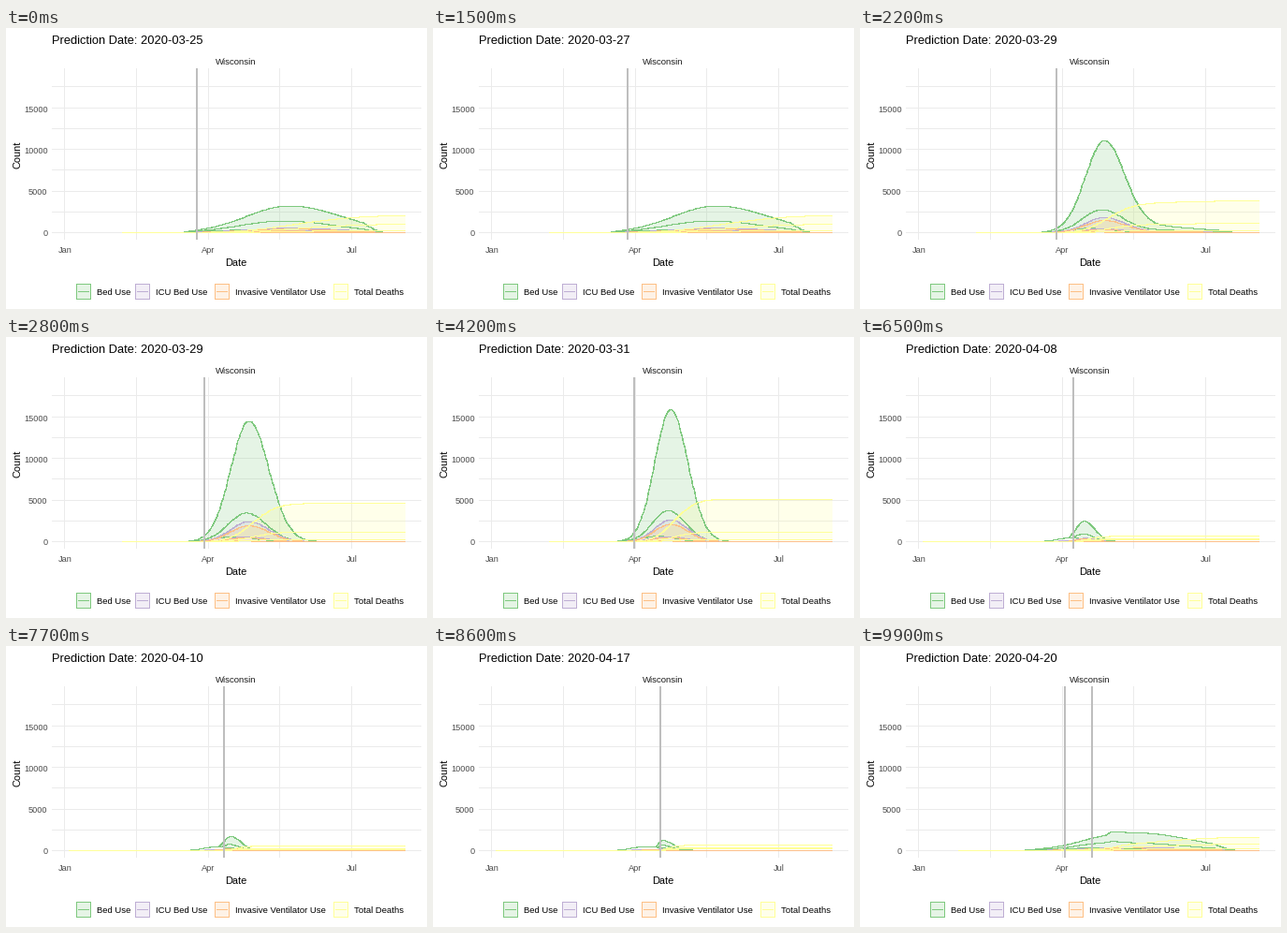
A matplotlib script that plays this animation: 450 by 300 pixels, repeating every 10 s.

```python
import math

import matplotlib.pyplot as plt
import numpy as np
from matplotlib.animation import FuncAnimation
from matplotlib.patches import Polygon, Rectangle

W, H, DPI = 450, 300, 100
PX = 72 / DPI
plt.rcParams["font.family"] = "Liberation Sans"

# plot geometry in pixels
LEFT, RIGHT, TOP, BOTTOM = 49, 444, 43, 226
JAN, DAY_W = 62.5, 1.687
ZERO, UNIT = 218.5, 0.00889
X_END = 426.6

LEGEND = [("Bed Use", "#7fc97f", 75), ("ICU Bed Use", "#beaed4", 138),
          ("Invasive Ventilator Use", "#fdc086", 223), ("Total Deaths", "#ffff99", 350)]
COLORS = [color for _, color, _ in LEGEND]

# release days counted from 1 January
DAYS = [84, 85, 86, 88, 89, 90, 91, 95, 97, 98, 100, 103, 107, 110]
U = np.linspace(0, 1, 214)


def day_x(day):
    return JAN + DAY_W * day


def sigmoid(z):
    return 1 / (1 + np.exp(-np.clip(z, -50, 50)))


def bump(x, peak, left, right):
    return np.exp(-0.5 * ((x - peak) / np.where(x < peak, left, right)) ** 2)


def outlook(day):
    """Peak x, left and right spread, past level, (high, mean, low) of beds and deaths."""
    if day < 88:
        return 303, 46, 56, 0, (3200, 1400, 330), (2050, 1000, 270)
    run = 95 if day == 97 else day  # 7 April repeats the run of 5 April
    early = max(0, 95 - run)
    peak = max(240 + 3 * early, day_x(run) + 2)
    left = 20 * math.exp((88 - run) / 13)
    right = 11 + 1.5 * early
    past = 450 if run > 90 else 0
    high = min(14000 + 1500 * (run - 88), 1150 + 3450 * math.exp((95 - run) / 3.1))
    dead = 0.1 * high ** 1.12 + 40 * max(0, run - 98)
    return (peak, left, right, past,
            (high, 400 + 0.21 * high, 250 + 0.025 * high),
            (dead, min(0.5 * dead, 1150), min(0.3 * dead, 270)))


def build(day):
    """x positions and a (measure, high/mean/low, point) array of counts."""
    peak, left, right, past, beds, deaths = outlook(day)
    first = 124.5 if day < 98 else 67
    x = first + (X_END - first) * U
    limits = sigmoid((x - 192) / 4) * np.clip((404 - x) / 22, 0, 1)
    rise = sigmoid((x - 208) / 5)
    bed, dead = [], []
    for h, total, shift, hold in zip(beds, deaths, (0, 0.15, 0.8), (1, 0.7, 0.3)):
        wave = h * bump(x, peak - shift * left, left, right) * limits
        foot = past * rise * sigmoid((peak + 20 * hold - x) / 6)
        bed.append(np.maximum(wave, foot))
        grown = np.cumsum(bump(x, peak + 4, left, right))
        dead.append(total * grown / grown[-1])
    bed = np.array(bed)
    return x, np.array([bed, 0.165 * bed, 0.132 * bed, dead])


CURVES = [build(day) for day in DAYS]


def label(day):
    month, date = (3, day - 59) if day < 91 else (4, day - 90)
    return f"Prediction Date: 2020-{month:02d}-{date:02d}"


def locate(frame):
    """Current forecast, progress to the next one, forecast named in the title."""
    for i in range(len(DAYS)):
        # a move every 7 frames, the first few slightly ahead of the beat
        beat = 7 * (i + 1)
        start, end = beat - 3 // (i + 1), beat + 2 - (3 >> i)
        if frame < start:
            return i, 0, i
        if frame < end:
            step, steps = frame - start + 1, end - start + 1
            return i, step / steps, i + (step > math.ceil(steps / 2))


fig = plt.figure(figsize=(W / DPI, H / DPI), dpi=DPI, facecolor="white")
ax = fig.add_axes([0, 0, 1, 1])
ax.set_xlim(0, W)
ax.set_ylim(H, 0)
ax.axis("off")


def stroke(xs, ys, color, width=0.3, z=3):
    """Hard-edged line; every touched pixel is filled, so thin means one pixel."""
    return ax.plot(xs, ys, color=color, lw=width * PX, antialiased=False,
                   snap=False, solid_capstyle="butt", zorder=z)[0]


def write(x, y, text, size, color="black", **kw):
    return ax.text(x, y, text, fontsize=size * PX, color=color, zorder=8, **kw)


def pixel(v):
    return np.floor(v) + 0.5


# grid and axes
for count in range(0, 20000, 2500):
    y = pixel(ZERO - count * UNIT)
    stroke([LEFT, RIGHT], [y, y], "#ebebeb", z=1)
    if count % 5000 == 0:
        write(44.5, y + 4, str(count), 9.1, "#4d4d4d", ha="right")
for day in np.arange(0, 183, 45.5):
    x = pixel(day_x(day))
    stroke([x, x], [TOP, BOTTOM], "#ebebeb", z=1)
for day, month in zip((0, 91, 182), ("Jan", "Apr", "Jul")):
    write(day_x(day) + 0.3, 240.5, month, 9.3, "#4d4d4d", ha="center")
write(246, 254, "Date", 11, ha="center")
write(12, 135.5, "Count", 11, ha="center", va="center", rotation=90)
write(245.8, 39, "Wisconsin", 9.5, "#1a1a1a", ha="center")
title = write(48.9, 17, "", 12.85)

for name, color, x in LEGEND:
    ax.add_patch(Rectangle((x, 273), 16, 17, fc=color, alpha=0.2, lw=0,
                           antialiased=False))
    l, r, t, b = x + 0.5, x + 15.5, 273.5, 289.5
    stroke([l, r, r, l, l], [t, t, b, b, t], color)
    stroke([x + 2, x + 14], [281.5, 281.5], color)
    write(x + 22.2, 285, name, 9.5)

bands = [ax.add_patch(Polygon([[0, 0]], fc=c, alpha=0.2, lw=0,
                              antialiased=False, zorder=2)) for c in COLORS]
lines = [[stroke([], [], c) for _ in range(3)] for c in COLORS]
marks = [stroke([], [], "#bebebe", 1.5, 5) for _ in range(2)]


def place_mark(mark, x):
    x = round(x)
    mark.set_data([x, x], [TOP, BOTTOM])


def draw(frame):
    i, t, named = locate(frame)
    j = (i + 1) % len(DAYS)
    (xa, va), (xb, vb) = CURVES[i], CURVES[j]
    x = pixel(xa + (xb - xa) * t)
    y = pixel(ZERO - (va + (vb - va) * t) * UNIT)

    for band, trio, rows in zip(bands, lines, y):
        band.set_xy(np.column_stack([np.r_[x, x[::-1]],
                                     np.r_[rows[0], rows[2][::-1]]]))
        for line, row in zip(trio, rows):
            line.set_data(x, row)

    here, there = day_x(DAYS[i]), day_x(DAYS[j])
    now = here + (there - here) * t
    place_mark(marks[0], now)
    # the last date keeps a second mark until the loop closes
    place_mark(marks[1], here if j == 0 else now)
    title.set_text(label(DAYS[named]))
    return []


anim = FuncAnimation(fig, draw, frames=100, interval=100, repeat=True,
                     repeat_delay=0, init_func=lambda: draw(0), blit=False)
plt.show()
```
